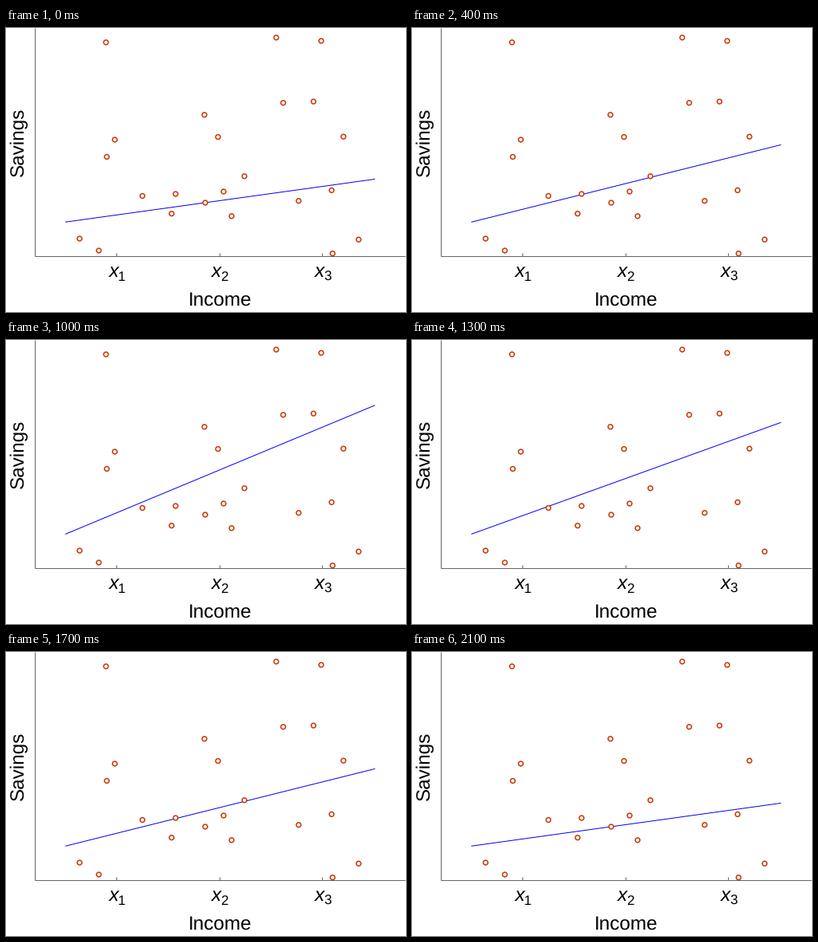
Recreate the animation shown at these times as a matplotlib script. Size 500 by 356 pixels, loop 2200 ms.

```python
import matplotlib.pyplot as plt
from matplotlib.animation import FuncAnimation
from matplotlib.patches import Circle

W, H, DPI = 500, 356, 100
PT = 72 / DPI  # points per pixel
FRAMES, INTERVAL = 22, 100
STEPS = 10

AXIS_X, AXIS_Y = 36, 286
TICK_X, TICK_GAP = 138.2, 128.5
LINE_X, LINE_Y, LINE_W = 74.6, 243.2, 386.2
RISE, LIFT = 53.7, 10.75  # first rise of the line, extra rise per step

# observed households, grouped around each income level
SAMPLES = [
    (92, 264), (116, 279), (125, 18), (126, 161.5), (136, 140), (170.5, 210.5),
    (207, 232.7), (212, 208), (248, 108.8), (249, 219), (265, 136.6),
    (272, 205), (282, 235.8), (298, 185.8),
    (337.8, 12), (346.5, 93.8), (365.8, 216.7), (384.4, 92.2), (394, 16.2),
    (407, 203.4), (408.2, 282.7), (421.8, 136.2), (440.8, 265.2),
]

plt.rcParams.update({"font.family": "Liberation Sans",
                     "text.hinting": "none"})

fig = plt.figure(figsize=(W / DPI, H / DPI), dpi=DPI, facecolor="white")
ax = fig.add_axes([0, 0, 1, 1])
ax.set_xlim(0, W)
ax.set_ylim(H, 0)
ax.axis("off")


def rule(x, y):
    ax.plot(x, y, color="#666666", lw=PT, solid_capstyle="butt", zorder=1)


def label(x, y, text, size=24.2, **kw):
    ax.text(x, y, text, fontsize=size * PT, color="black",
            va="baseline", **kw)


rule([AXIS_X, AXIS_X], [0, AXIS_Y])
rule([AXIS_X, W - 1], [AXIS_Y, AXIS_Y])
for k in range(3):
    x = TICK_X + k * TICK_GAP
    rule([x, x], [AXIS_Y - 4, AXIS_Y])
    label(x - 9.5, 312.3, "x", style="italic")
    label(x + 1.7, 317.3, str(k + 1), size=17)

label(267.4, 348, "Income", ha="center")
label(22.2, 142.8, "Savings", ha="center", rotation=90,
      rotation_mode="anchor")

for p in SAMPLES:
    ax.add_patch(Circle(p, 2.9, fc="white", ec="#cc3300", lw=1.5 * PT,
                        zorder=3))
trend, = ax.plot([], [], color="#0000ff", lw=PT, zorder=2)


def update(i):
    # rise for ten steps, hold one, then fall back
    step = min(i, FRAMES - 1 - i, STEPS)
    end_y = LINE_Y - RISE - LIFT * step
    trend.set_data([LINE_X, LINE_X + LINE_W], [LINE_Y, end_y])
    return trend,


anim = FuncAnimation(fig, update, frames=FRAMES, interval=INTERVAL,
                     repeat=True, repeat_delay=0, blit=False)
plt.show()
```
